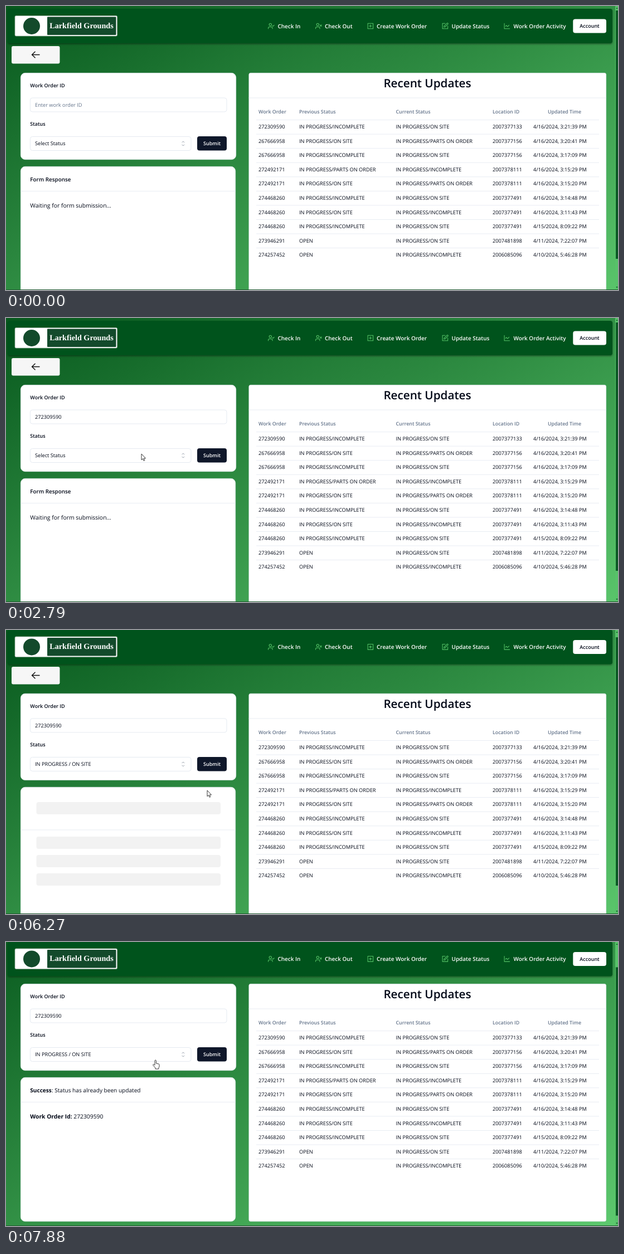
These frames come from a looping animation (1098x510 px, 8000 ms). An HTML page:

```html
<!DOCTYPE html>
<html lang="en">
<head>
<meta charset="utf-8">
<title>Work order status</title>
<style>
html, body { margin: 0; width: 100%; height: 100%; overflow: hidden; background: #0c5c22; }
svg { display: block; width: 1098px; height: 510px; font-family: "Open Sans", "Noto Sans", sans-serif; }
text { white-space: pre; text-rendering: geometricPrecision; }
</style>
</head>
<body>
<svg id="stage" viewBox="0 0 1098 510"></svg>
<script>
const stage = document.getElementById('stage');
const TEXT = '#020817', INK = '#0f172a', LINE = '#e2e8f0', MUTED = '#64748b';
const BOLD = 'font-weight="600"';

const STATUS = {
  I: 'IN PROGRESS/INCOMPLETE', S: 'IN PROGRESS/ON SITE',
  P: 'IN PROGRESS/PARTS ON ORDER', O: 'OPEN'
};
const ROWS = `272309590 I S 2007377133 16 3:21:39
267666958 S P 2007377156 16 3:20:41
267666958 I S 2007377156 16 3:17:09
272492171 P I 2007378111 16 3:15:29
272492171 S P 2007378111 16 3:15:20
274468260 I S 2007377491 16 3:14:48
274468260 S I 2007377491 16 3:11:43
274468260 I S 2007377491 15 8:09:22
273946291 O S 2007481898 11 7:22:07
274257452 O I 2006085096 10 5:46:28`.split('\n').map(r => r.split(' '));

const OPTIONS = [
  ...['DISPATCHED CONFIRMED', 'ON SITE', 'PARTS ON ORDER', 'INCOMPLETE', 'UNSATISFACTORY',
    'WAITING FOR QUOTE', 'PROPOSAL APPROVED'].map(s => 'IN PROGRESS / ' + s),
  ...['CONFIRMED', 'PENDING CONFIRMATION', 'CANCELLED', 'NO CHARGE'].map(s => 'COMPLETED / ' + s)
];
const HINTS = ['Two weeks or less', 'A week or less', 'sda', '1233', '123', '2'];

const PERSON = 'M16 21v-2a4 4 0 0 0-4-4H6a4 4 0 0 0-4 4v2M13 7a4 4 0 1 1-8 0a4 4 0 1 1 8 0';
const NAV = [
  [469.5, 487.5, 'Check In', PERSON + 'M16 11l2 2l4-4'],
  [554.5, 572, 'Check Out', PERSON + 'M17 8l5 5M22 8l-5 5'],
  [647.5, 665, 'Create Work Order', 'M3 3h18v18h-18zM8 12h8M12 8v8'],
  [781.5, 799.5, 'Update Status', 'M12 3H3v18h18v-9M18.4 2.6a2.1 2.1 0 0 1 3 3L12 15l-4 1l1-4z'],
  [892.5, 910.5, 'Work Order Activity', 'M3 3v18h18M19 9l-5 5l-4-4l-3 3']
];

// time, x, y of the pointer
const POINTER = [
  [250, 1030, 498], [520, 258, 226], [790, 258, 226], [1180, 205, 181], [1950, 205, 181],
  [2520, 247, 243], [2590, 243, 244], [3300, 243, 244], [3600, 283, 246], [3740, 283, 246],
  [3900, 246, 244], [3960, 245, 246], [4160, 229, 270], [4560, 229, 270], [4830, 373, 261],
  [5590, 373, 261], [5850, 361, 288], [7280, 361, 288], [7880, 267, 212]
];
const SCROLL = [[6269, 0], [6270, 6], [6620, 31], [6760, 39.5], [6900, 45]];

const clamp = v => Math.max(0, Math.min(1, v));
const ramp = (t, a, b) => clamp((t - a) / (b - a));

function track(keys, t) {
  const i = keys.findIndex(k => k[0] > t);
  if (i === 0) return keys[0].slice(1);
  if (i < 0) return keys[keys.length - 1].slice(1);
  const a = keys[i - 1], b = keys[i], f = ramp(t, a[0], b[0]);
  return a.slice(1).map((v, j) => v + (b[j + 1] - v) * f);
}

// y is the middle of the capitals
const text = (x, y, s, size = 9.22, attrs = '') =>
  `<text x="${x}" y="${y + size * 0.357}" font-size="${size}" fill="${TEXT}" ${attrs}>${s}</text>`;
const strong = s => `<tspan font-weight="700">${s}</tspan>`;
const rect = (x, y, w, h, r, fill, attrs = '') =>
  `<rect x="${x}" y="${y}" width="${w}" height="${h}" rx="${r}" fill="${fill}" ${attrs}/>`;
const path = (d, stroke, w, attrs = '') =>
  `<path d="${d}" fill="none" stroke="${stroke}" stroke-width="${w}" ${attrs}/>`;
const rule = (x1, x2, y) => path(`M${x1} ${y}H${x2}`, LINE, 0.8);
const group = (attrs, ...parts) => `<g ${attrs}>${parts.join('')}</g>`;
const card = (x, y, w, h, r) =>
  rect(x + 0.35, y + 0.35, w - 0.7, h - 0.7, r, '#fff', `stroke="${LINE}" stroke-width=".7"`);
const field = (x, y, w, focus) => focus
  ? rect(x - 0.3, y - 0.6, w + 0.9, 26, 4, '#fff', `stroke="${INK}" stroke-width="1.2"`)
  : rect(x + 0.4, y, w - 0.4, 25, 4, '#fff', `stroke="${LINE}" stroke-width=".9"`);

const shadow = (id, alpha) => `<filter id="${id}" x="-10%" y="-20%" width="120%" height="150%">
  <feDropShadow dx="0" dy="1.5" stdDeviation="1.6" flood-opacity="${alpha}"/></filter>`;
const defs = `<defs>
  <linearGradient id="bg" x1="0" y1="0" x2="1" y2="1">
    <stop stop-color="#07581d"/><stop offset="1" stop-color="#5dc96e"/></linearGradient>
  ${shadow('shade', 0.4)}${shadow('soft', 0.18)}
</defs>`;

function header(scroll, wide) {
  const top = -Math.min(scroll, 5.6), dx = wide ? 7.5 : 0;
  return group(`transform="translate(0 ${top})"`,
    rect(3, 5, 1085 + dx, 62, 4, '#02531a', 'filter="url(#shade)"'),
    rect(16, 17.5, 183.5, 36.5, 2, '#fff', 'stroke="#8fa893" stroke-width=".8"'),
    rect(74, 19.5, 123.5, 32.5, 1, '#134a2b'),
    '<circle cx="46" cy="36" r="15" fill="#134a2b"/>',
    `<text x="135.5" y="40" font-size="14.2" font-weight="700" fill="#fff" text-anchor="middle"
      font-family="'Liberation Serif', serif">Larkfield Grounds</text>`,
    group(`transform="translate(${dx} 0)"`,
      ...NAV.map(([ix, x, label, d]) =>
        path(d, '#55c267', 2, `transform="translate(${ix} 29.6) scale(.53)" stroke-linecap="round" stroke-linejoin="round"`) +
        text(x, 36, label, 9.95, BOLD + ' style="fill:#fff"')),
      rect(1017.3, 23.5, 59.7, 25, 4, '#fff'),
      text(1047, 36, 'Account', 9, BOLD + ' text-anchor="middle"')));
}

function table(wide) {
  const grow = wide ? 7.4 : 0;
  const col = x => x + grow * (x - 449) / 615;
  const cols = [453, 526, 699.5, 873, 946].map(col);
  const heads = ['Work Order', 'Previous Status', 'Current Status', 'Location ID', 'Updated Time'];
  return card(435.5, 120, 641.5 + grow, 427, 3) +
    text(756 + grow / 2, 138.2, 'Recent Updates', 20.7, BOLD + ' text-anchor="middle"') +
    rule(435.5, 1077 + grow, 165) +
    heads.map((h, i) => text(i < 4 ? cols[i] : col(972), 190.3, h, 8.85, BOLD + ` style="fill:${MUTED}"`)).join('') +
    ROWS.map(([id, prev, cur, loc, day, time], i) => {
      const y = 217 + i * 25.55;
      const cells = [id, STATUS[prev], STATUS[cur], loc, `4/${day}/2024, ${time} PM`];
      return rule(449, 1064 + grow, y - 12.4) + cells.map((c, j) => text(cols[j], y, c)).join('');
    }).join('');
}

function form(t) {
  const typed = t >= 1800, chosen = t >= 4300;
  const inputFocus = t >= 1320 && t < 2790, selectFocus = t >= 4300 && t < 5040;
  return card(26, 120, 387, 156, 8) +
    text(43.3, 142.5, 'Work Order ID', 9, BOLD) +
    field(43, 165, 353, inputFocus) +
    (typed ? text(52, 178, '272309590') : text(52, 178, 'Enter work order ID', 9.22, `style="fill:${MUTED}"`)) +
    (t >= 1730 && t < 2790 ? path(`M${typed ? 100.5 : 52} 172v11.5`, INK, 0.8) : '') +
    text(43.3, 212, 'Status', 9, BOLD) +
    field(43, 234.5, 289, selectFocus) +
    text(52, 247, chosen ? OPTIONS[1] : 'Select Status') +
    path('M315.6 245.2l2.2-2.2l2.2 2.2M315.6 248.8l2.2 2.2l2.2-2.2', '#8b93a0', 0.9) +
    rect(343, 234, 53, 25.5, 4, INK) +
    text(369.5, 247, 'Submit', 9, BOLD + ' text-anchor="middle" style="fill:#fff"');
}

function response(t) {
  const panel = card(26, 288, 386, 259, 8);
  if (t < 5040)
    return panel + text(43.3, 311, 'Form Response', 9.85, BOLD) + rule(26, 412, 332.5) +
      text(43.3, 358, 'Waiting for form submission...', 10.4);
  if (t < 6870) {
    const fill = t < 6400 ? '#f2f2f2' : '#efefef';
    return panel + rule(26, 412, 365) +
      [315, 377, 410, 443].map(y => rect(54.5, y, 330.5, 22, 4, fill)).join('');
  }
  return panel + text(43.3, 311, strong('Success') + ': Status has already been updated', 10.1) +
    rule(26, 412, 332.5) + text(43.3, 358.5, strong('Work Order Id:') + ' 272309590', 10.3);
}

function hints(t) {
  const alpha = Math.min(ramp(t, 1320, 1450), 1 - ramp(t, 1790, 1870));
  if (!alpha) return '';
  return group(`opacity="${alpha}"`,
    '<path d="M119.5 197l6-6l6 6z" fill="#2b2b2e"/>',
    rect(111.5, 196.5, 115.5, 154.5, 2, '#2b2b2e', 'filter="url(#soft)"'),
    ...HINTS.map((h, i) => text(120, 212 + i * 24.8, h, 8.3, BOLD + ' style="fill:#fff"')));
}

function menu(t, y) {
  if (t < 3140 || t >= 4370) return '';
  const hover = Math.max(0, Math.floor((y - 236) / 22));
  const alpha = Math.min(ramp(t, 3080, 3260), 1 - ramp(t, 4290, 4370));
  return group(`opacity="${alpha}"`,
    rect(44, 232.5, 287.5, 269.5, 4, '#fff', `stroke="${LINE}" stroke-width=".8" filter="url(#soft)"`),
    rect(47, 236 + hover * 22.05, 282, 22, 2, '#f1f5f9'),
    ...OPTIONS.map((o, i) => text(53, 247 + i * 22.05, o)),
    path('M185 493l2.8 2.8l2.8-2.8', INK, 1));
}

function pointer(t, x, y) {
  if (t < 250) return '';
  let shape;
  if (t > 1000 && t < 2500 && y < 190)
    shape = path('M-2-5.5h1.5l.5.5l.5-.5h1.5M0-5v10M-2 5.5h1.5l.5-.5l.5.5h1.5', '#111', 1);
  else if (t > 7280 && y < 216)
    shape = `<path d="M0 1.5Q0 0 1.2 0T2.4 1.5V6l4.8 1Q8 7.3 8 8.5V11Q8 13 6.8 14V16H1V14L-3 9.5
      Q-3.8 8.3-2.8 7.8T0 9.2Z" fill="#fff" stroke="#222" stroke-width=".9"/>`;
  else
    shape = `<path d="M0 0V10.8L2.4 8.6L4.1 12.4L5.8 11.7L4.2 8H7.5Z"
      fill="#fff" stroke="#222" stroke-width=".9"/>`;
  return group(`transform="translate(${x} ${y})"`, shape);
}

function scrollbar(scroll) {
  const top = 8 + scroll * 0.83;
  return rect(1093, 0, 5, 510, 0, '#57c269') +
    rect(1094, top, 4, 446, 0, '#0b5824') +
    '<path d="M1094.5 5l1.5-2.5l1.5 2.5zM1094.5 504l1.5 2.5l1.5-2.5z" fill="#0b5824"/>';
}

function scene(t) {
  const wide = t >= 3140 && t < 4335;
  const [scroll] = track(SCROLL, t), [x, y] = track(POINTER, t);
  return defs +
    group(`transform="translate(0 ${-scroll})"`,
      rect(0, 0, 1098, 555, 0, 'url(#bg)'),
      rect(10, 72, 86.5, 31.5, 3, '#f6f6f6'),
      path('M60.5 87.5H46.5M52.5 81.7L46.5 87.5L52.5 93.3', '#111', 1.4),
      form(t), response(t), table(wide)) +
    header(scroll, wide) + hints(t) + menu(t, y) +
    (wide ? '' : scrollbar(scroll)) +
    rect(0, 509, 1098, 1, 0, '#1f5a30') +
    pointer(t, x, y);
}

let shown = '';
function draw() {
  const next = scene(performance.now() % 8000);
  if (next !== shown) stage.innerHTML = shown = next;
  requestAnimationFrame(draw);
}
draw();
</script>
</body>
</html>
```
